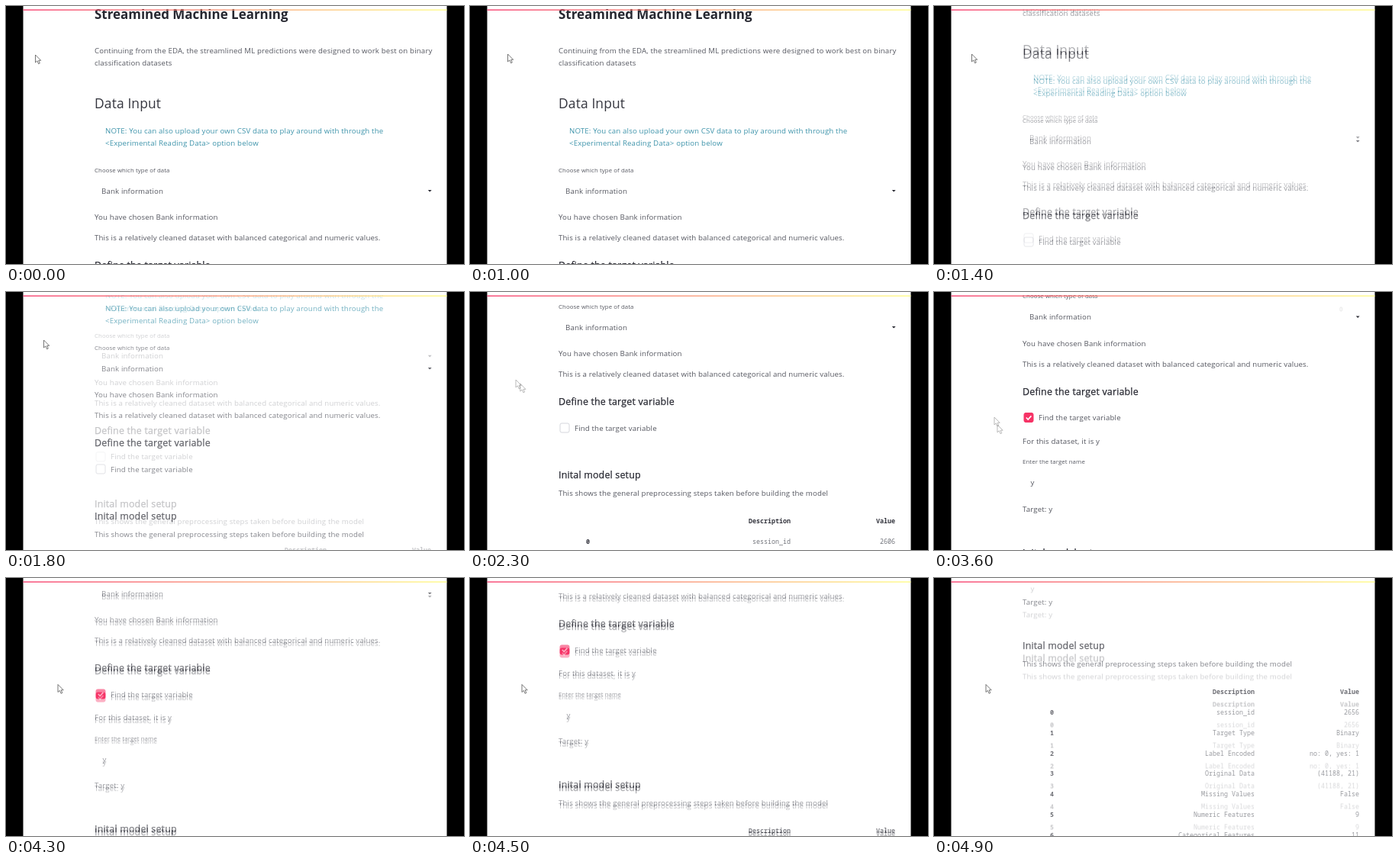
An HTML page that plays this animation: 600x338 px, repeating every 5 s.

```html
<!DOCTYPE html>
<html lang="en">
<head>
<meta charset="utf-8">
<title>Machine learning page walkthrough</title>
<style>
  html, body { margin: 0; width: 100%; height: 100%; overflow: hidden; background: #000; }
  svg { display: block; width: 100vw; height: 100vh; }
  text { font-family: "Open Sans", "Noto Sans", sans-serif; font-size: 9.7px; letter-spacing: .14px; fill: #565861; white-space: pre; }
  .title { font-size: 16.95px; font-weight: 700; letter-spacing: 0; fill: #262730; }
  .section { font-size: 17.4px; fill: #34353e; }
  .heading { font-size: 12.4px; letter-spacing: .2px; fill: #262730; stroke: #262730; stroke-width: .25px; }
  .label { font-size: 7.8px; letter-spacing: .1px; }
  .note { fill: #3f94ab; }
  .cell, .strong { font-family: "Noto Sans Mono", "DejaVu Sans Mono", monospace; font-size: 8.35px; letter-spacing: 0; fill: #72747b; text-anchor: end; }
  .strong { font-weight: 600; fill: #34353e; }
  #scene { isolation: isolate; }
  #ghost { mix-blend-mode: plus-lighter; }
</style>
</head>
<body>
<svg viewBox="0 0 600 338">
  <defs>
    <linearGradient id="barFill">
      <stop stop-color="#f63366"/><stop offset="1" stop-color="#fffd80"/>
    </linearGradient>
    <clipPath id="view"><rect x="22" y="4" width="556" height="334"/></clipPath>
    <path id="arrow" d="M0 0V10L2.4 7.9L4.1 11.8L5.8 11L4.2 7.3H7.2Z" fill="#fff" stroke="#555" stroke-width=".8"/>
    <path id="hand" d="M3.2 8V1.5Q4.2 0 5.2 1.5V5.5Q6.5 4.5 7.2 5.8Q8.5 5 9 6.2Q10.6 5.6 10.8 7.5V10.5L9.6 14H4.4L.6 9.4Q.2 7.4 2 7.6Z" fill="#fff" stroke="#444" stroke-width=".8"/>
  </defs>
  <rect x="22.5" width="555" height="338" fill="#fff"/>
  <g clip-path="url(#view)">
    <g id="scene">
      <g id="main"><g id="page">
        <path d="M552.8 241h4.8l-2.4 2.6z" fill="#262730"/>
        <rect id="box" x="118" y="368" width="12" height="12" rx="2"/>
        <path id="tick" d="M120.8 374l2.4 2.5 4.2-4.6" fill="none" stroke="#fff" stroke-width="1.6"/>
        <g id="answer"></g>
        <g id="setup"></g>
      </g></g>
      <use id="ghost" href="#page"/>
    </g>
    <rect id="running" x="532" y="20" width="2.5" height="5" rx="1" fill="none" stroke="#ddd" stroke-width=".7"/>
    <rect x="22.5" y="4.5" width="555" height="1.3" fill="url(#barFill)"/>
  </g>
  <use id="cursorGhost" href="#arrow"/>
  <use id="cursor" href="#arrow"/>
</svg>
<script>
const $ = id => document.getElementById(id);

// Adds one line of text whose capitals are centred on y.
function addText(parent, x, y, content, style = "body", size = 10) {
  const node = document.createElementNS("http://www.w3.org/2000/svg", "text");
  node.setAttribute("x", x);
  node.setAttribute("y", y + size * 0.35);
  node.setAttribute("class", style);
  node.textContent = content;
  parent.append(node);
  return node;
}

const page = $("page"), answer = $("answer"), setup = $("setup");
addText(page, 116, 11, "Streamined Machine Learning", "title", 17);
addText(page, 116, 58.3, "Continuing from the EDA, the streamlined ML predictions were designed to work best on binary");
addText(page, 116, 74.8, "classification datasets");
addText(page, 116, 128, "Data Input", "section", 17.6);
addText(page, 130, 163, "NOTE: You can also upload your own CSV data to play around with through the", "note");
addText(page, 130, 179.5, "<Experimental Reading Data> option below", "note");
addText(page, 116, 215, "Choose which type of data", "label", 8);
addText(page, 125, 242, "Bank information");
addText(page, 116, 276.8, "You have chosen Bank information");
addText(page, 116, 303.5, "This is a relatively cleaned dataset with balanced categorical and numeric values.");
addText(page, 116, 340, "Define the target variable", "heading", 12.5);
addText(page, 137, 374, "Find the target variable");

addText(answer, 116, 404.5, "For this dataset, it is y");
addText(answer, 116, 431.7, "Enter the target name", "label", 8);
addText(answer, 126.5, 459, "y");
addText(answer, 116, 493.5, "Target: y");

addText(setup, 116, 435.8, "Inital model setup", "heading", 12.5);
addText(setup, 116, 459, "This shows the general preprocessing steps taken before building the model");
addText(setup, 420, 496.3, "Description", "strong", 8.3);
addText(setup, 557, 496.3, "Value", "strong", 8.3);
const cells = [
  ["session_id", "2606"], ["Target Type", "Binary"], ["Label Encoded", "no: 0, yes: 1"],
  ["Original Data", "(41188, 21)"], ["Missing Values", "False"],
  ["Numeric Features", "9"], ["Categorical Features", "11"]
].map(([name, value], row) => {
  const y = 523 + row * 26.8;
  addText(setup, 157, y, row, "strong", 8.3);
  addText(setup, 420, y, name, "cell", 8.3);
  return addText(setup, 557, y, value, "cell", 8.3);
});

// Keyframes: time in ms, then the values at that time.
const scrollKeys = [
  [0, 0], [1100, 0], [1200, 8], [1300, 50], [1400, 65], [1500, 80], [1600, 122], [1700, 131],
  [1800, 142], [1900, 191], [2000, 196], [3260, 196], [3261, 209.5],
  [4200, 209.5], [4300, 222], [4400, 268], [4500, 280], [4600, 328], [4700, 372], [4800, 412], [4900, 462], [5000, 462]
];
const cursorKeys = [
  [0, 38.5, 64], [500, 49.5, 63], [1800, 49.5, 63], [2300, 60, 115], [2700, 130, 176.5], [3200, 130, 176.5],
  [3400, 104, 190], [3500, 91, 194], [3600, 79, 164], [3700, 71, 150], [3800, 66, 142], [4000, 65, 140],
  [4300, 68, 139.5], [5000, 68, 139.5]
];

function valuesAt(keys, time) {
  const next = Math.max(1, keys.findIndex(key => key[0] >= time));
  const [a, b] = [keys[next - 1], keys[next]];
  const part = (time - a[0]) / (b[0] - a[0]);
  return a.slice(1).map((value, i) => value + (b[i + 1] - value) * part);
}

const move = (node, x, y) => node.setAttribute("transform", `translate(${x} ${y})`);
const show = (node, visible) => node.setAttribute("visibility", visible ? "inherit" : "hidden");

function draw(now) {
  const time = Math.floor(now % 5000 / 100) * 100;
  const blendTime = Math.max(0, time + (time < 2500 ? 33 : -33));
  const checked = time >= 2900, expanded = time >= 3300;

  $("box").setAttribute("fill", checked ? "#f63366" : "#fff");
  $("box").setAttribute("stroke", checked ? "#f63366" : "#d5d6dc");
  show($("tick"), checked);
  show(answer, expanded);
  show($("running"), time >= 2900 && time < 3700);
  move(setup, 0, expanded ? 115 : 0);
  cells[0].textContent = expanded ? "2656" : "2606";

  // Moving content is blended with a neighbouring moment.
  const [scroll] = valuesAt(scrollKeys, time);
  const [blendScroll] = valuesAt(scrollKeys, blendTime);
  const gap = Math.abs(scroll - blendScroll);
  const fade = gap < 0.1 ? 0 : gap < 6 ? 0.4 : 0.28;
  move($("main"), 0, -scroll);
  move($("ghost"), 0, -blendScroll);
  $("main").setAttribute("opacity", 1 - fade);
  $("ghost").setAttribute("opacity", fade);

  const [x, y] = valuesAt(cursorKeys, time);
  const [blendX, blendY] = valuesAt(cursorKeys, blendTime);
  const blurred = Math.hypot(x - blendX, y - blendY) > 6;
  const pointing = time >= 2700 && time < 3300;
  $("cursor").setAttribute("href", pointing ? "#hand" : "#arrow");
  $("cursor").setAttribute("opacity", blurred ? 0.5 : 1);
  move($("cursor"), x, y);
  move($("cursorGhost"), blendX, blendY);
  $("cursorGhost").setAttribute("opacity", blurred ? 0.5 : 0);
}

const start = performance.now();
function loop() {
  draw(performance.now() - start);
  requestAnimationFrame(loop);
}
loop();
</script>
</body>
</html>
```
